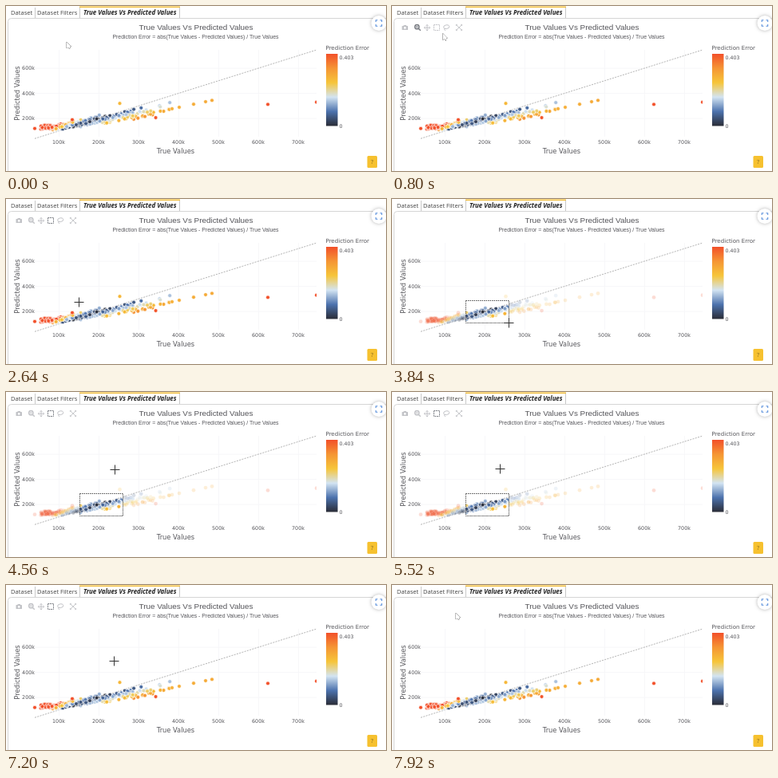
Recreate the animation shown at these times as an HTML page with a canvas. Size 476 px wide and 207 px high, loop 8000 ms.

```html
<!DOCTYPE html>
<html lang="en">
<head>
<meta charset="utf-8">
<title>True Values Vs Predicted Values</title>
<style>
  html, body { margin: 0; width: 100%; height: 100%; overflow: hidden; background: #fff; }
  canvas { display: block; width: 476px; height: 207px; }
</style>
</head>
<body>
<canvas id="stage"></canvas>
<script>
const W = 476, H = 207, LOOP = 8000, TURN = 2 * Math.PI;
const canvas = document.getElementById('stage');
const ratio = window.devicePixelRatio || 1;
canvas.width = W * ratio;
canvas.height = H * ratio;
const ctx = canvas.getContext('2d');

const UI = '"Open Sans", sans-serif';
const HEAD = '"Liberation Sans", sans-serif';
const AXIS = '"DejaVu Sans", sans-serif';
const INK = '#55555a', IDLE = '#c2c3c7', ACTIVE = '#777a81';

// Values are in units of 100k.
const px = v => 16 + 50 * v;
const py = v => 172.6 - 15.75 * v;
const PLOT = { left: 36, top: 55, right: 389, bottom: 164 };

// Evenly spaced, from no error to the largest error.
const SCALE = ['#2a2c36', '#4c72ad', '#d3e4f2', '#f6c53a', '#f59534', '#f2502a'];
const MAX_ERROR = 0.403;

function scaleColor(f) {
  const at = Math.min(0.9999, f) * (SCALE.length - 1);
  const i = Math.floor(at);
  const mix = [1, 3, 5].map(c => {
    const [a, b] = [SCALE[i], SCALE[i + 1]].map(s => parseInt(s.slice(c, c + 2), 16));
    return Math.round(a + (b - a) * (at - i));
  });
  return `rgb(${mix})`;
}

let seed = 20117;
const rand = () => (seed = (seed * 16807) % 2147483647) / 2147483647;
const spread = () => (rand() + rand() + rand() - 1.5) * 1.5;

function makePoints() {
  const list = [];
  const add = (v, p) => list.push({
    x: px(v), y: py(p), color: scaleColor(Math.abs(v - p) / v / MAX_ERROR)
  });
  for (let i = 0; i < 310; i++) {
    const v = 0.55 + 3.3 * Math.min(rand(), rand());
    add(v, Math.max(1.28, 0.8 + 0.53 * v) + (0.06 + 0.075 * v) * spread());
  }
  for (const v of [3.84, 4.02, 4.38, 4.68, 4.84]) add(v, 0.2 + 0.67 * v);
  add(0.4, 1.2);
  add(1.34, 1.9);
  add(2.53, 3.2);
  add(6.24, 3.12);
  add(7.46, 3.3);
  return list;
}
const points = makePoints();

function text(str, x, y, size, { font = AXIS, align = 'left', color = INK, style = '' } = {}) {
  ctx.font = `${style} ${size}px ${font}`;
  ctx.textAlign = align;
  ctx.fillStyle = color;
  ctx.fillText(str, x, y);
}

function rect(color, x, y, w, h, r = 0) {
  ctx.fillStyle = color;
  ctx.beginPath();
  ctx.roundRect(x, y, w, h, r);
  ctx.fill();
}

function line(color, width, ...coords) {
  ctx.strokeStyle = color;
  ctx.lineWidth = width;
  ctx.beginPath();
  for (let i = 0; i < coords.length; i += 2) ctx.lineTo(coords[i], coords[i + 1]);
  ctx.stroke();
}

function circle(x, y, r) {
  ctx.beginPath();
  ctx.arc(x, y, r, 0, TURN);
}

function dashedRect(color, dash, x, y, w, h) {
  ctx.setLineDash(dash);
  ctx.strokeStyle = color;
  ctx.lineWidth = 1;
  ctx.strokeRect(x, y, w, h);
  ctx.setLineDash([]);
}

// Draws one part four times around a centre.
function quarters(x, y, part) {
  for (let i = 0; i < 4; i++) {
    ctx.save();
    ctx.translate(x, y);
    ctx.rotate(i * TURN / 4);
    part();
    ctx.restore();
  }
}

function drawPage() {
  rect('#fff', 0, 0, W, H);
  const tab = { font: UI, color: '#444' };
  text('Dataset', 6, 11.3, 7.6, tab);
  text('Dataset Filters', 39, 11.3, 7.55, tab);
  text('True Values Vs Predicted Values', 97, 11.3, 7.87, { font: UI, color: '#222', style: 'italic bold' });
  for (const x of [36.5, 92.5, 217.5]) line('#c8c8c8', 1, x, 2, x, 15);
  rect('#f1bd3c', 92, 0.6, 126, 1.5);
  ctx.strokeStyle = '#d6d6d6';
  ctx.beginPath();
  ctx.roundRect(2.5, 15.5, W, H, 4);
  ctx.stroke();

  ctx.save();
  ctx.shadowColor = 'rgba(0,0,0,.3)';
  ctx.shadowBlur = 4 * ratio;
  ctx.fillStyle = '#fff';
  circle(467, 21.5, 9.5);
  ctx.fill();
  ctx.restore();
  quarters(467, 21.5, () => line('#5a90dc', 1.1, 1.5, -3.7, 3.7, -3.7, 3.7, -1.5));

  rect('#f6c12f', 452.5, 188, 12.5, 15, 1.5);
  text('?', 458.7, 198.3, 7.5, { font: UI, align: 'center', color: '#8a6c22' });
}

function drawChart() {
  const mid = { align: 'center' }, head = { font: HEAD, align: 'center' };
  text('True Values Vs Predicted Values', 238, 30, 9.9, head);
  text('Prediction Error = abs(True Values - Predicted Values) / True Values', 237.5, 41, 6.92, head);

  for (let v = 1; v <= 7; v++) {
    line('#f7f7f9', 1, px(v) + 0.5, PLOT.top, px(v) + 0.5, PLOT.bottom);
    text(v + '00k', px(v), 173, 6.4, mid);
  }
  for (let v = 2; v <= 6; v += 2) {
    line('#f7f7f9', 1, PLOT.left, py(v), PLOT.right, py(v));
    text(v + '00k', 36, py(v) + 2.3, 6.4, { align: 'right' });
  }
  text('True Values', 212.5, 184.7, 8.3, mid);
  ctx.save();
  ctx.translate(17.3, 109.5);
  ctx.rotate(-TURN / 4);
  text('Predicted Values', 0, 0, 8.25, mid);
  ctx.restore();

  ctx.setLineDash([2, 1.4]);
  line('#aaa', 0.9, px(0.4), py(0.4), px(7.46), py(7.46));
  ctx.setLineDash([]);

  text('Prediction Error', 400.5, 55.3, 7.06);
  const fade = ctx.createLinearGradient(0, 150.5, 0, 60);
  SCALE.forEach((color, i) => fade.addColorStop(i / (SCALE.length - 1), color));
  rect(fade, 401, 60, 14.5, 90.5);
  text(MAX_ERROR, 417.5, 67, 6.3);
  text('0', 417.5, 153, 6.3);
}

function drawPoints(box) {
  ctx.save();
  ctx.beginPath();
  ctx.rect(PLOT.left - 3, PLOT.top, PLOT.right - PLOT.left + 3, PLOT.bottom - PLOT.top);
  ctx.clip();
  ctx.strokeStyle = '#fff';
  ctx.lineWidth = 0.6;
  for (const p of points) {
    const picked = !box || (p.x >= box.x && p.x <= box.x + box.w && p.y >= box.y && p.y <= box.y + box.h);
    ctx.globalAlpha = picked ? 1 : 0.2;
    ctx.fillStyle = p.color;
    circle(p.x, p.y, 2.4);
    ctx.fill();
    ctx.stroke();
  }
  ctx.restore();
}

function drawModebar(selecting, hover) {
  // Camera
  rect(IDLE, 12.5, 25, 7.5, 5, 0.5);
  rect(IDLE, 14.5, 24, 3.5, 2);
  ctx.fillStyle = '#fff';
  circle(16.2, 27.4, 1.4);
  ctx.fill();

  // Zoom
  const zoom = selecting ? IDLE : ACTIVE;
  line(zoom, 1.5, 33.2, 28.2, 35.8, 30.8);
  circle(31.3, 26.2, 2.6);
  ctx.stroke();
  quarters(31.3, 26.2, () => line(zoom, 0.8, 0, 0, 1.3, 0));

  // Pan
  quarters(44, 27.2, () => {
    line(IDLE, 1, 0, 0, 3.6, 0);
    line(IDLE, 1, 2.4, -1.3, 3.8, 0, 2.4, 1.3);
  });

  // Box select
  dashedRect(selecting || hover ? ACTIVE : IDLE, [1.8, 0.8], 52.5, 23.5, 7, 7);

  // Lasso
  line(IDLE, 1, 66, 28, 65.6, 29.5, 67, 31);
  ctx.beginPath();
  ctx.ellipse(68.2, 26.2, 3.6, 2.4, -0.2, 0, TURN);
  ctx.stroke();

  // Autoscale
  quarters(84, 27, () => {
    line(IDLE, 0.9, 0, 0, 3.6, -3.6);
    line(IDLE, 0.8, 2, -3.7, 3.7, -3.7, 3.7, -2);
  });

  if (hover) {
    rect('#5c6379', 53, 33, 41, 13);
    text('Box Select', 73.5, 41.8, 6.6, { font: HEAD, align: 'center', color: '#fff' });
  }
}

function drawArrow(x, y) {
  line('#555', 0.8, x, y, x, y + 8, x + 2, y + 6.4, x + 3.6, y + 9, x + 4.2, y + 6, x + 5.6, y + 5.7, x, y);
  ctx.fillStyle = '#fff';
  ctx.fill();
}

function drawHand(x, y) {
  const shape = grow => {
    const color = grow ? '#444' : '#fff';
    rect(color, x - 1 - grow, y - grow, 1.6 + 2 * grow, 6 + 2 * grow, 0.8);
    rect(color, x - 2 - grow, y + 4 - grow, 6 + 2 * grow, 5 + 2 * grow, 1.5);
  };
  shape(0.7);
  shape(0);
}

function drawCross(x, y) {
  quarters(Math.round(x) + 0.5, Math.round(y) + 0.5, () => line('#333', 1, -0.5, 0, 6, 0));
}

// Time, x and y of each stop of the pointer.
const PATH = [
  [0, 76, 45], [400, 76, 45], [1120, 55, 27], [2160, 55, 27], [2640, 91, 129],
  [2960, 92, 127], [3680, 146, 155], [3920, 146, 155], [4480, 136, 97], [6400, 135, 95]
];
const PRESS = 2960, RELEASE = 3920, CLEAR = 6240, RESTART = 7760;

function pointerAt(t) {
  if (t >= RESTART) return { x: 80, y: 35 };
  const i = PATH.findIndex(p => p[0] > t);
  const [t1, x1, y1] = PATH.at(i);
  if (i < 0) return { x: x1, y: y1 };
  const [t0, x0, y0] = PATH[i - 1];
  const k = (t - t0) / (t1 - t0);
  const ease = k * k * (3 - 2 * k);
  return { x: x0 + (x1 - x0) * ease, y: y0 + (y1 - y0) * ease };
}

function selectionAt(t) {
  if (t <= PRESS || t >= CLEAR) return null;
  const from = pointerAt(PRESS), to = pointerAt(Math.min(t, RELEASE));
  return { x: from.x, y: from.y, w: to.x - from.x, h: to.y - from.y };
}

function snap(t) {
  const part = t % 400;
  return t - part + (part < 160 ? 0 : Math.floor(part / 80) * 80);
}

function render(t) {
  ctx.setTransform(ratio, 0, 0, ratio, 0, 0);
  const { x, y } = pointerAt(t);
  const hover = t >= 1120 && t <= 2160;
  const box = selectionAt(t);
  const dragging = t > PRESS && t < RELEASE + 320;
  drawPage();
  drawChart();
  drawPoints(box);
  if (box) dashedRect('#555', [1.5, 1], box.x + 0.5, box.y + 0.5, box.w, box.h);
  if (t >= 240 && t < RESTART && !dragging) drawModebar(t >= 2080, hover);
  const draw = hover ? drawHand : y < PLOT.top ? drawArrow : drawCross;
  draw(x, y);
}

const start = performance.now();
function tick() {
  render(snap((performance.now() - start) % LOOP));
  requestAnimationFrame(tick);
}
tick();
</script>
</body>
</html>
```
